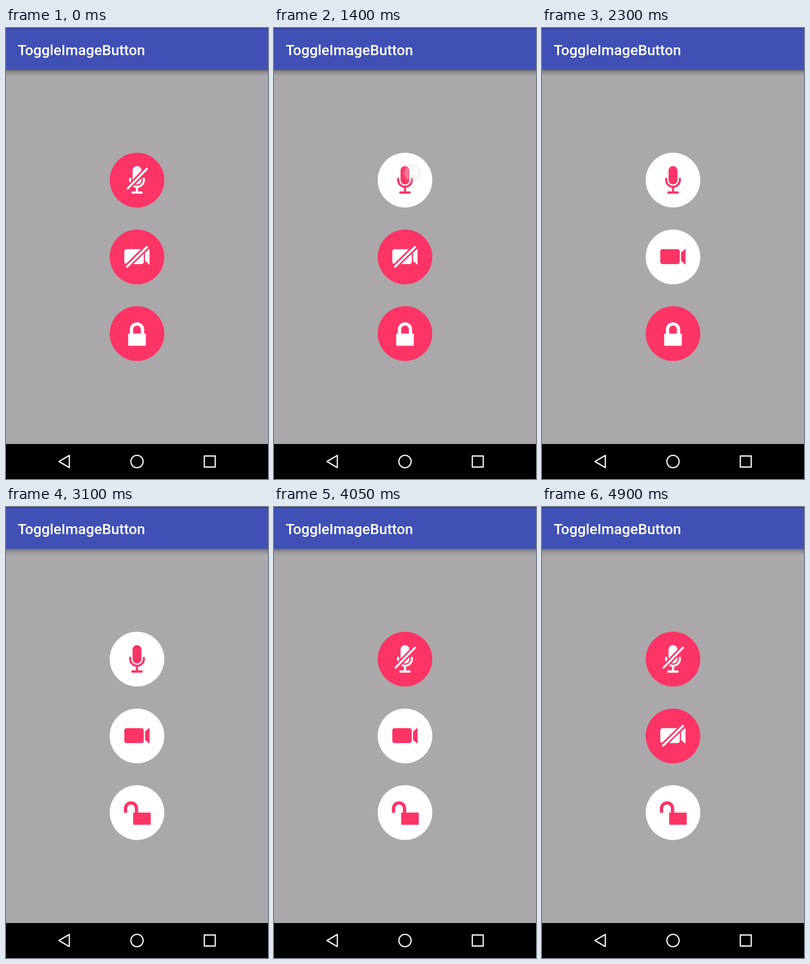
Animation of 571x980 px, one loop 4.95 s. Source, as an HTML page:

```html
<!DOCTYPE html>
<html lang="en">
<head>
<meta charset="utf-8">
<title>ToggleImageButton</title>
<style>
  html, body { margin: 0; height: 100%; overflow: hidden; background: #aaa8aa; }
  svg { display: block; width: 100vw; height: 100vh; }
  .title { font: 500 31.7px Roboto, sans-serif; fill: #fff; }
  .button { --face: #fd3466; --ink: #fff; }
  .button.on { --face: #fff; --ink: #fd3466; }
  .face { fill: var(--face); }
  .ink { fill: var(--ink); }
  .line { fill: none; stroke: var(--ink); stroke-linecap: round; }
  .gap { stroke: var(--face); stroke-width: 11.5; }
  .slash { stroke: #fff; stroke-width: 4.6; stroke-linecap: round; }
  .on .off-only { display: none; }
  .on .shackle { transform: translate(-13px, 0); }
  .on .lock-body { transform: translate(10.8px, 0); }
</style>
</head>
<body>
<svg viewBox="0 0 571 980">
  <defs>
    <linearGradient id="shadow" x2="0" y2="1">
      <stop offset="0" stop-color="#000" stop-opacity=".36"/>
      <stop offset=".4" stop-color="#000" stop-opacity=".14"/>
      <stop offset="1" stop-color="#000" stop-opacity="0"/>
    </linearGradient>
    <radialGradient id="glow">
      <stop offset=".74" stop-color="#fff" stop-opacity=".35"/>
      <stop offset="1" stop-color="#fff" stop-opacity="0"/>
    </radialGradient>
  </defs>

  <rect width="571" height="980" fill="#aaa8aa"/>
  <rect y="91" width="571" height="14" fill="url(#shadow)"/>
  <rect width="571" height="91" fill="#4050b4"/>
  <rect width="571" height="2" fill="#303d9c"/>
  <text class="title" x="25.4" y="59">ToggleImageButton</text>

  <!-- Icons are drawn around the centre of each button -->
  <g class="button" transform="translate(285.5 330.5)">
    <circle class="face" r="59.5"/>
    <rect class="ink" x="-9.7" y="-30.5" width="19.4" height="40" rx="9.7"/>
    <path class="line" stroke-width="4.6" d="M-15-3v2.5a15 15 0 0 0 30 0V-3M0 15v11"/>
    <path class="line" stroke-width="5" d="M-10 27h20"/>
    <g class="off-only">
      <path class="gap" d="M-21 19 21-24"/>
      <path class="slash" d="M-20.5 18.5 21.5-24.5"/>
    </g>
  </g>

  <g class="button" transform="translate(285.5 497.5)">
    <circle class="face" r="59.5"/>
    <rect class="ink" x="-27.7" y="-17" width="42.5" height="32.5" rx="5"/>
    <path class="ink" d="M17.5-9.5 27.3-18V17L17.5 8.5z"/>
    <g class="off-only">
      <path class="gap" d="M-22 21 22-22"/>
      <path class="slash" d="M-21.5 21 21.5-21.5"/>
    </g>
  </g>

  <g class="button" transform="translate(285.5 664)">
    <circle class="face" r="59.5"/>
    <path class="line shackle" stroke-width="7.2" style="stroke-linecap:butt" d="M-12 .3V-9a12 12 0 0 1 24 0V.3"/>
    <rect class="ink lock-body" x="-19.2" y="0" width="38.4" height="26.5" rx="1.5"/>
  </g>

  <g id="touch">
    <circle r="22" fill="url(#glow)"/>
    <circle r="16.5" fill="#ededf0" fill-opacity=".5" stroke="#a99fae" stroke-opacity=".6" stroke-width="1.4"/>
  </g>

  <rect y="904" width="571" height="76"/>
  <g fill="none" stroke="#f2f2f2" stroke-width="2.8" stroke-linejoin="round">
    <path d="M115.500 942 138 928.800V955.200z"/>
    <circle cx="285.500" cy="942" r="13.300"/>
    <rect x="432.200" y="930" width="23.800" height="24"/>
  </g>
</svg>

<script>
const LOOP = 4950, STEP = 50, FADE = 200;
const buttons = document.querySelectorAll('.button');
const touch = document.getElementById('touch');

// Each tap flips its button shortly after contact, while the touch spot fades out.
const taps = [
  { start: 1250, end: 1500, button: 0, x: 301, y: 315 },
  { start: 2050, end: 2300, button: 1, x: 308, y: 505 },
  { start: 2850, end: 3100, button: 2, x: 304, y: 674 },
  { start: 3750, end: 4050, button: 0, x: 303, y: 326 },
  { start: 4650, end: 4900, button: 1, x: 304, y: 502 },
];

function render(now) {
  const time = Math.floor(now % LOOP / STEP) * STEP;
  const on = [false, false, false];
  let opacity = 0;
  for (const { start, end, button, x, y } of taps) {
    if (time >= end - 150) on[button] = !on[button];
    if (time >= start && time < end) {
      opacity = Math.min(1, (end - time) / FADE);
      touch.setAttribute('transform', `translate(${x} ${y})`);
    }
  }
  buttons.forEach((button, i) => button.classList.toggle('on', on[i]));
  touch.setAttribute('opacity', opacity);
}

const origin = performance.now();
function tick() {
  render(performance.now() - origin);
  requestAnimationFrame(tick);
}
tick();
</script>
</body>
</html>
```
